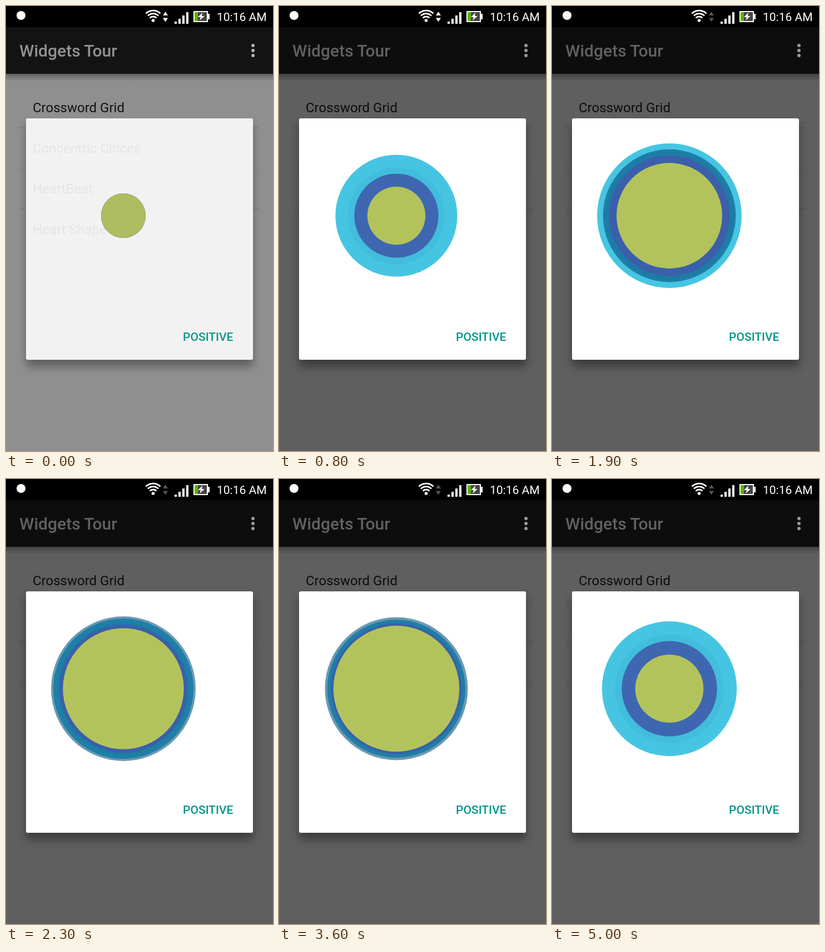
An HTML page for the animation above (5.1 s loop, 480x800 px).

```html
<!DOCTYPE html>
<html lang="en">
<head>
<meta charset="utf-8">
<title>Pulsing circles</title>
<style>
  html, body { margin: 0; width: 100%; height: 100%; overflow: hidden; background: #000; }
  svg { display: block; width: 480px; height: 800px; font-family: Roboto, sans-serif; }
  .title { font-size: 30px; font-weight: 500; fill: #fff; }
  .item { font-size: 24px; fill: #000; fill-opacity: .87; }
  .button { font-size: 21px; font-weight: 500; fill: #009688; }
  .clock { font-size: 21px; fill: #fff; }
</style>
</head>
<body>
<svg viewBox="0 0 480 800" xmlns="http://www.w3.org/2000/svg">
  <defs>
    <filter id="blur" x="-20%" y="-20%" width="140%" height="140%">
      <feGaussianBlur stdDeviation="8"/>
    </filter>
    <linearGradient id="drop" x2="0" y2="1">
      <stop offset="0" stop-opacity=".3"/>
      <stop offset="1" stop-opacity="0"/>
    </linearGradient>
  </defs>

  <rect width="480" height="800" fill="#fafafa"/>
  <g id="list"></g>
  <rect y="122" width="480" height="13" fill="url(#drop)"/>
  <rect y="38" width="480" height="84" fill="#212121"/>
  <text class="title" x="24" y="91">Widgets Tour</text>
  <rect id="scrim" y="38" width="480" height="762"/>
  <g id="menu">
    <circle cx="444" cy="71" r="3"/>
    <circle cx="444" cy="80" r="3"/>
    <circle cx="444" cy="89" r="3"/>
  </g>

  <g id="dialog">
    <rect x="36" y="214" width="408" height="434" opacity=".38" filter="url(#blur)"/>
    <rect x="36" y="202" width="408" height="434" rx="3" fill="#fff"/>
    <g id="rings"></g>
    <text class="button" x="408.500" y="602" text-anchor="end">POSITIVE</text>
  </g>

  <rect width="480" height="38"/>
  <g fill="#fff">
    <circle cx="27" cy="17" r="8"/>
    <circle cx="264.500" cy="26" r="2.800"/>
    <g fill="none" stroke="#fff" stroke-width="2.800">
      <path d="M258.500 21.500a8.500 8.500 0 0 1 12 0"/>
      <path d="M255 17.500a13.500 13.500 0 0 1 19 0"/>
      <path d="M251.500 13.500a18.500 18.500 0 0 1 26 0"/>
    </g>
    <path id="arrows" d="M282 17l4.500-7 4.500 7zM282 21.500h9l-4.500 7z"/>
    <path d="M303 28h4v4h-4zM310 23h4v9h-4zM317 17h4v15h-4zM324 11h4v21h-4z"/>
    <path d="M337 9h26v5h3v10h-3v5h-26z"/>
    <path d="M339 11h22v16h-22z" fill="#444"/>
    <path d="M339 11h6v16h-6z" fill="#5fb300"/>
    <path d="M353 12l-8 8h5l-2 6 9-8h-5z"/>
  </g>
  <text class="clock" x="468.500" y="27" text-anchor="end">10:16 AM</text>
</svg>
<script>
const LOOP = 5100, STEP = 100, RISE = 3000, DELAY = 35;
const get = id => document.getElementById(id);
const clamp = v => Math.max(0, Math.min(1, v));

function add(parent, tag, attrs) {
  const el = document.createElementNS("http://www.w3.org/2000/svg", tag);
  for (const key in attrs) el.setAttribute(key, attrs[key]);
  return parent.appendChild(el);
}

["Crossword Grid", "Concentric Cirlces", "HeartBeat", "Heart Shape"].forEach((label, i) => {
  add(get("list"), "text", { class: "item", x: 48, y: 191 + 73 * i }).textContent = label;
  if (i < 3) add(get("list"), "rect", { x: 24, y: 218 + 73 * i, width: 432, height: 1, "fill-opacity": .14 });
});

const decelerate = power => x => 1 - (1 - x) ** power;
const overshoot = x => {
  const v = x - 1;
  return v * v * (3 * v + 2) + 1;
};
const anticipateOvershoot = x => {
  const v = 2 * x;
  if (v < 1) return v * v * (4 * v - 3) / 2;
  const w = v - 2;
  return (w * w * (4 * w + 3) + 2) / 2;
};
const smooth = x => (1 - Math.cos(Math.PI * x)) / 2;

// back to front: easing, colour, opacity
const rings = [
  [overshoot, "#46c5e2", 1],
  [decelerate(3), "#004e7e", .06],
  [anticipateOvershoot, "#034e7e", .58],
  [decelerate(2), "#3f5bac", .89],
  [smooth, "#b3c35c", 1]
].map(([ease, fill, opacity]) => ({
  ease,
  el: add(get("rings"), "circle", { cx: 211, cy: 377, fill, "fill-opacity": opacity })
}));

function draw(t) {
  const along = Math.max(0, t - DELAY) / RISE;
  const x = along > 1 ? 2 - along : along;
  for (const { ease, el } of rings) el.setAttribute("r", 40 + 80 * ease(x));

  const dim = clamp(t / 200);
  get("scrim").setAttribute("opacity", .43 + .19 * dim);
  const grey = Math.round(176 - 22 * dim);
  get("menu").setAttribute("fill", `rgb(${grey},${grey},${grey})`);
  get("dialog").setAttribute("opacity", .89 + .11 * clamp(t / 100));
  get("arrows").setAttribute("fill", t < 1900 ? "#fff" : "#555");
}

const start = performance.now();
function tick() {
  const t = (performance.now() - start) % LOOP;
  draw(Math.floor(t / STEP) * STEP);
  requestAnimationFrame(tick);
}
tick();
</script>
</body>
</html>
```
